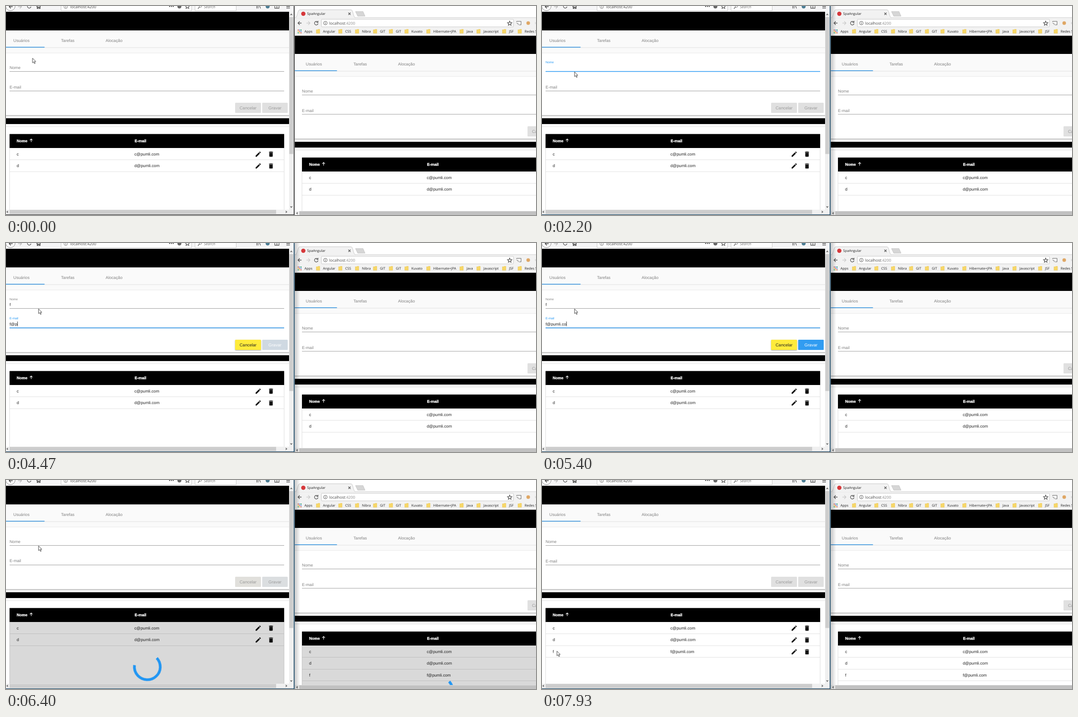
Animation of 1189x471 px, one loop 8 s. Source, as an HTML page:

```html
<!DOCTYPE html>
<html lang="pt">
<head>
<meta charset="utf-8">
<title>Cadastro</title>
<style>
html, body { margin: 0; width: 100%; height: 100%; overflow: hidden; background: #fff; }
#stage { display: block; width: 1189px; height: 471px; }
text { font: 9.2px "Liberation Sans", Arial, sans-serif; text-rendering: geometricPrecision; white-space: pre; }
.ui text { font: 7.7px "Open Sans", "Noto Sans", sans-serif; fill: #222; }
.ui .url { font-size: 8.65px; fill: #444; }
.th { font-size: 8.7px; font-weight: bold; fill: #fff; stroke: #fff; stroke-width: .35px; }
.tab { fill: #808080; }
.label { fill: #808080; }
.btn text { font-size: 9.5px; fill: #9a9a9a; }
.btn rect { fill: #e0e0e0; }
.line { fill: none; stroke: #555; stroke-width: 1.3; }
.ripple, .caret, .busy, .added { opacity: 0; }
.ripple { transform-box: fill-box; transform-origin: center; }

.live *, .frame, .shade, .pointer, .busy, .busy *, .added { animation: 8s infinite cubic-bezier(.25,.8,.25,1); }
.frame { fill: #333; animation-name: frame; animation-timing-function: step-end; }
.shade { opacity: 0; animation-name: shade; animation-timing-function: step-end; }
.pointer { animation-name: pointer; animation-timing-function: linear; }
.live .name .label { animation-name: nameLabel; }
.live .name .ripple { animation-name: nameRipple; }
.live .name .edge { animation: nameEdge 8s step-end infinite; }
.live .name .caret { animation: nameCaret 8s step-end infinite; }
.live .mail .label { animation-name: mailLabel; }
.live .mail .ripple { animation-name: mailRipple; }
.live .mail .edge { animation: mailEdge 8s step-end infinite; }
.live .mail .caret { animation: mailCaret 8s step-end infinite; }
.live .cancel rect { animation-name: cancel; }
.live .cancel text { animation-name: cancelText; }
.live .save rect { animation-name: save; }
.live .save text { animation-name: saveText; }
.busy { animation: busy 8s step-end infinite; }
.busy g { animation-name: turn; animation-timing-function: linear; }
.busy circle { animation-name: arc; animation-timing-function: cubic-bezier(.35,0,.25,1); }
.added { animation: addedRemote 8s step-end infinite; }
.live .added { animation: addedLocal 8s step-end infinite; }

@keyframes frame { 0% { fill: #333 } 5.8%, 100% { fill: #17425f } }
@keyframes shade { 0% { opacity: 0 } 5.8%, 100% { opacity: 1 } }
@keyframes pointer {
  0%, .7% { transform: translate(59.5px,117.5px) }
  3.5% { transform: translate(66px,135px) }
  6.6%, 88.4% { transform: translate(73px,148.5px) }
  89.1% { transform: translate(78px,142px) }
  90.9% { transform: translate(105px,133px) }
  92.5% { transform: translate(129px,152px) }
  94.1% { transform: translate(132px,220px) }
  95.75% { transform: translate(110px,310px) }
  97.5% { transform: translate(60px,372px) }
  99%, 100% { transform: translate(33.5px,385.5px) }
}
@keyframes nameLabel {
  0%, 8% { transform: none; fill: #808080 }
  13%, 35.875% { transform: translateY(-13.5px) scale(.75); fill: #2196f3 }
  39%, 76.69% { transform: translateY(-13.5px) scale(.75); fill: #808080 }
  81.69%, 100% { transform: none; fill: #808080 }
}
@keyframes mailLabel {
  0%, 35.875% { transform: none; fill: #808080 }
  40.875%, 76.69% { transform: translateY(-13.5px) scale(.75); fill: #2196f3 }
  81.69%, 100% { transform: none; fill: #808080 }
}
@keyframes nameRipple {
  0%, 8% { opacity: 0; transform: scaleX(.5) }
  9.5% { opacity: 1 }
  12%, 35.875% { opacity: 1; transform: none }
  39.625%, 100% { opacity: 0; transform: none }
}
@keyframes mailRipple {
  0%, 35.875% { opacity: 0; transform: scaleX(.5) }
  37.2% { opacity: 1 }
  39.625%, 76.69% { opacity: 1; transform: none }
  80.44%, 100% { opacity: 0; transform: none }
}
@keyframes nameEdge {
  0% { transform: none } 30.75% { transform: translateX(2.6px) } 76.69%, 100% { transform: none }
}
@keyframes nameCaret {
  0% { opacity: 0 } 8.25% { opacity: 1 } 14% { opacity: 0 }
  20.75% { opacity: 1 } 27.4% { opacity: 0 }
  30.75% { opacity: 1 } 35.8%, 100% { opacity: 0 }
}
@keyframes mailEdge {
  0% { transform: none }
  41.5% { transform: translateX(2.6px) }
  43.25% { transform: translateX(11.9px) }
  55.75% { transform: translateX(17.1px) }
  57.4% { transform: translateX(22.2px) }
  59% { transform: translateX(29.9px) }
  60.8% { transform: translateX(31.9px) }
  62.4% { transform: translateX(34px) }
  64% { transform: translateX(36.5px) }
  65.75% { transform: translateX(41.1px) }
  67.4% { transform: translateX(46.2px) }
  69% { transform: translateX(54px) }
  76.69%, 100% { transform: none }
}
@keyframes mailCaret {
  0% { opacity: 0 } 35.8% { opacity: 1 } 49% { opacity: 0 }
  55.75% { opacity: 1 } 75.8%, 100% { opacity: 0 }
}
@keyframes cancel {
  0%, 30.75% { fill: #e0e0e0; filter: drop-shadow(0 0 0 #0000) }
  35.75%, 76.8% { fill: #ffeb3b; filter: drop-shadow(0 1px .8px #0006) }
  81.8%, 100% { fill: #e0e0e0; filter: drop-shadow(0 0 0 #0000) }
}
@keyframes cancelText {
  0%, 30.75% { fill: #9a9a9a } 31.5%, 76.69% { fill: #222 } 77.5%, 100% { fill: #9a9a9a }
}
@keyframes save {
  0%, 55.75% { fill: #e0e0e0; filter: drop-shadow(0 0 0 #0000) }
  60.75%, 64% { fill: #2196f3; filter: drop-shadow(0 1px .8px #0006) }
  65.75% { fill: #b5cfe4; filter: drop-shadow(0 0 .3px #0002) }
  70%, 76.8% { fill: #2196f3; filter: drop-shadow(0 1px .8px #0006) }
  81.8%, 100% { fill: #e0e0e0; filter: drop-shadow(0 0 0 #0000) }
}
@keyframes saveText {
  0%, 30.75% { fill: #9a9a9a } 31.5%, 76.69% { fill: #fff } 77.5%, 100% { fill: #9a9a9a }
}
@keyframes busy { 0% { opacity: 0 } 76.6% { opacity: 1 } 84.6%, 100% { opacity: 0 } }
@keyframes addedLocal { 0% { opacity: 0 } 84.6%, 100% { opacity: 1 } }
@keyframes addedRemote { 0% { opacity: 0 } 79%, 100% { opacity: 1 } }
@keyframes turn {
  0%, 76.75% { transform: rotate(-90deg) } 89.25%, 100% { transform: rotate(90deg) }
}
@keyframes arc {
  0%, 76.75% { stroke-dasharray: 18 360; stroke-dashoffset: 0 }
  83% { stroke-dasharray: 288 360; stroke-dashoffset: 0 }
  89.25%, 100% { stroke-dasharray: 18 360; stroke-dashoffset: -270 }
}
</style>
</head>
<body>
<svg id="stage" viewBox="0 0 1189 471"></svg>
<script>
const rect = (x, y, w, h, fill, more = '') =>
  `<rect x="${x}" y="${y}" width="${w}" height="${h}" fill="${fill}" ${more}/>`;
const text = (x, y, s, cls = '', more = '') => `<text x="${x}" y="${y}" class="${cls}" ${more}>${s}</text>`;
const path = (d, more = 'class="line"') => `<path d="${d}" ${more}/>`;
const dot = (x, y, r, fill) => `<circle cx="${x}" cy="${y}" r="${r}" fill="${fill}"/>`;
const ring = (x, y, r, color = '#555') =>
  `<circle cx="${x}" cy="${y}" r="${r}" fill="none" stroke="${color}"/>`;
const star = (x, y) => path(`M${x} ${y - 5}l1.4 3.3 3.6.3-2.7 2.4.8 3.5-3.1-1.9-3.1 1.9.8-3.5-2.7-2.4 3.6-.3z`);
const reload = (x, y) => path(`M${x + 3} ${y - 2.5}A4 4 0 1 0 ${x + 4} ${y + 1}M${x + 4} ${y - 5}v3.6h-3.6`);
const arrow = (x, y, dir, color) =>
  path(`M${x + 4 * dir} ${y}H${x - 4 * dir}M${x} ${y - 4}L${x + 4 * dir} ${y}L${x} ${y + 4}`,
    `fill="none" stroke="${color}" stroke-width="1.4"`);

const PEN = 'M3 17.25V21h3.75L17.81 9.94l-3.75-3.75zM20.71 7.04a1 1 0 0 0 0-1.41l-2.34-2.34a1 1 0 0 0-1.41 0l-1.83 1.83 3.75 3.75z';
const BIN = 'M6 19c0 1.1.9 2 2 2h8c1.1 0 2-.9 2-2V7H6zM19 4h-3.5l-1-1h-5l-1 1H5v2h14z';
const icon = (d, x, y) => path(d, `fill="#111" transform="translate(${x} ${y}) scale(.65)"`);

const field = (cls, y, label, value) => `<g class="${cls}" transform="translate(8 ${y})">
  ${rect(0, 5, 616, 1, '#9a9a9a')}
  <rect class="ripple" y="4.8" width="616" height="1.5" fill="#2196f3"/>
  ${text(0, 0, value, '', 'fill="#222"')}
  <g class="edge">${rect(0, -9, 66, 12, '#fff')}<rect class="caret" x=".2" y="-8.5" width="1" height="10.5" fill="#222"/></g>
  ${text(0, 0, label, 'label')}</g>`;

const button = (cls, x, w, label) => `<g class="btn ${cls}">
  ${rect(x, 218, w, 23, '#e0e0e0', 'rx="1.5"')}
  ${text(x + w / 2, 233, label, '', 'text-anchor="middle"')}</g>`;

const row = (i, id, cls = '') => {
  const y = 320 + 26.7 * i;
  return `<g class="${cls}">${text(24, y + 16.5, id, '', 'fill="#222"')}
  ${text(288, y + 16.5, id + '@pumli.com', '', 'fill="#222"')}
  ${icon(PEN, 558, y + 6)}${icon(BIN, 586.7, y + 6)}
  ${rect(8, Math.round(y + 26), 616, 1, '#e0e0e0')}</g>`;
};

const page = (cls, x, y, w, h, left, top) =>
  `<svg class="${cls}" x="${x}" y="${y}" width="${w}" height="${h}" viewBox="${left} ${top} ${w} ${h}">
  ${rect(-8, 0, 700, 500, '#fafafa')}
  ${rect(-8, 13, 700, 42, '#000')}
  ${text(16.5, 81, 'Usuários', 'tab')}${text(123.5, 81, 'Tarefas', 'tab')}${text(223.5, 81, 'Alocação', 'tab')}
  ${rect(-8, 93.3, 700, 1, '#dedede')}${rect(-8, 92, 94.5, 1.5, '#2a8fe0')}
  ${rect(-8, 105.5, 700, 1, '#e4e4e4')}${rect(-8, 106.5, 642.5, 140, '#fff')}
  ${rect(-8, 246, 643, 1.2, '#aaa')}${rect(-8, 247.2, 643, 1.3, '#dedede')}
  ${field('name', 142, 'Nome', 'f')}
  ${field('mail', 185.5, 'E-mail', 'f@pumli.com')}
  ${button('cancel', 514, 58, 'Cancelar')}${button('save', 574.7, 57.3, 'Gravar')}
  ${rect(-8, 253, 700, 13, '#000')}
  ${rect(-8, 271.5, 700, 1, '#e2e2e2')}${rect(-8, 272.5, 643, 200, '#fff')}
  ${rect(7.5, 289, 1, 180, '#dcdcdc')}${rect(623.5, 289, 1, 180, '#dcdcdc')}
  ${rect(8, 288.5, 616, 31.5, '#000')}
  ${text(24, 306.5, 'Nome', 'th')}${text(288.5, 306.5, 'E-mail', 'th')}
  ${path('M56.5 306.5V299.7M53.5 302.7l3-3 3 3', 'fill="none" stroke="#fff" stroke-width="1.2"')}
  ${row(0, 'c')}${row(1, 'd')}${row(2, 'f', 'added')}
  <g class="busy">${rect(8, 320, 616, 160, '#000', 'fill-opacity=".15"')}
    <g style="transform-origin:317px 421px"><circle cx="317" cy="421" r="29" fill="none"
      stroke="#2196f3" stroke-width="6" pathLength="360"/></g></g>
  </svg>`;

const leftBar = `<g class="ui">
  ${rect(0, 0, 646, 13, '#f6f6f7')}
  ${dot(10, 0, 10.5, '#fff')}${ring(10, 0, 10.5, '#888')}${arrow(11, 1.5, -1, '#444')}
  ${arrow(31, 1.5, 1, '#bbb')}${reload(52, .5)}
  ${path('M68.5 1L73 -3.5 77.5 1M70 0V5.5H72V2.5H74.5V5.5H76.5V0', 'fill="none" stroke="#444" stroke-width="1.5"')}
  ${rect(123.5, -8, 293, 18.5, '#fff', 'stroke="#c8c8c8"')}
  ${ring(134, 1.5, 4, '#777')}${rect(133.5, 0, 1, 4, '#777')}
  ${text(144, 4.7, 'localhost:4200', 'url')}
  ${[367, 371, 375].map(x => dot(x, 1, 1.2, '#444')).join('')}
  ${dot(389, 1, 4.5, '#666')}${star(407, 1)}
  ${rect(424, -8, 92.5, 18.5, '#fff', 'stroke="#c8c8c8"')}
  ${ring(436, 0, 3, '#777')}${path('M434 2.5l-3.5 3.5')}
  ${text(444, 4.7, 'Search', 'url', 'style="font-style:italic;fill:#777"')}
  ${path('M562.5 -2V5.5M565.5 -2V5.5M568 -2L571 5.5')}
  ${dot(587, 1, 4.5, '#4b7d94')}
  ${path('M603 -4H612.5V5H603ZM607.7 -4V5')}
  ${path('M629 1H637M629 4.5H637')}
</g>`;

const tri = (x, y, turn) => path('M-2 -1.6L0 1 2 -1.6',
  `fill="none" stroke="#505050" stroke-width="1.3" transform="translate(${x} ${y}) rotate(${turn})"`);

const leftScroll = rect(635, 13, 10, 446, '#f0f0f0') + rect(635.5, 25, 9, 308.5, '#cdcdcd')
  + tri(640, 19, 180) + tri(640, 453, 0)
  + rect(0, 459, 645, 11, '#f0f0f0') + rect(8, 459.5, 598, 9, '#cdcdcd')
  + tri(3, 464, 90) + tri(629, 464, -90);

const bookmarks = [[711, 'Angular'], [761, 'CSS'], [798.5, 'Nibra'], [839, 'GIT'], [874.5, 'GIT'], [909.5, 'Kuvato'],
  [958.5, 'Hibernate+JPA'], [1033, 'Java'], [1071, 'Javascript'], [1128.5, 'JSF'], [1163.5, 'Redes S']];

const folder = x => path(`M${x} 53.5h3l1 -1h4v9h-8z`, 'fill="#f7d768" stroke="#e2bd4b" stroke-width=".5"');

let apps = '';
for (let i = 0; i < 9; i++)
  apps += rect(654.5 + i % 3 * 3.2, 53 + (i / 3 | 0) * 3.2, 2.1, 2.1, ['#de5347', '#4a8af4', '#1aa260', '#f6b92b'][i % 4]);

const rightBar = `<g class="ui">
  ${rect(648, 26, 541, 41, '#f2f2f2')}${rect(648, 25.7, 541, .8, '#c4c4c4')}
  ${path('M649 26.8C654 26 654 8.5 659 8.5H774C779 8.5 779 26 784 26.8Z', 'fill="#f2f2f2" stroke="#bbb" stroke-width=".8"')}
  ${rect(649.5, 26, 134, 1.5, '#f2f2f2')}
  ${path('M784 12.5H801L805.5 23H789Z', 'fill="#d6d6d6" stroke="#bbb" stroke-width=".7"')}
  ${dot(667, 17.5, 4.8, '#d6383b')}${text(675.5, 20.3, 'SpaAngular')}
  ${path('M768 15l5 5M773 15l-5 5')}
  ${arrow(659, 38.5, -1, '#555')}${arrow(678, 38.5, 1, '#ccc')}${reload(696, 38.5)}
  ${rect(707.5, 30, 431, 17, '#fff', 'stroke="#bbb" stroke-width=".8" rx="1.5"')}
  ${ring(716.5, 38.5, 4)}${rect(716, 37.7, 1, 3.2, '#555')}${rect(716, 36, 1, 1, '#555')}
  <text x="725" y="41.6" class="url">localhost<tspan fill="#888">:4200</tspan></text>
  ${star(1130, 39)}
  ${path('M1145.5 36V34.5H1155.5V42.5H1151M1145.5 38.5A4 4 0 0 1 1149.5 42.5', 'fill="none" stroke="#666"')}
  ${dot(1171.5, 38.5, 4, '#dfa765')}${dot(1189, 38.5, 2.5, '#ddd')}
  ${apps}${text(669.5, 60, 'Apps')}
  ${bookmarks.map(([x, s]) => folder(x - 15) + text(x, 60, s)).join('')}
</g>`;

const rightScroll = rect(648, 462, 541, 9, '#f1f1f1') + rect(658, 462.5, 531, 8.5, '#c1c1c1') + tri(653, 467, 90);

stage.innerHTML = `<defs><linearGradient id="fade"><stop stop-opacity=".2"/><stop offset="1" stop-opacity="0"/></linearGradient></defs>
  ${rect(0, 0, 1189, 471, '#fff')}
  ${rightBar}${page('', 648, 67, 541, 395, -8, 14)}${rightScroll}
  ${rect(648, 0, 12, 471, 'url(#fade)', 'class="shade"')}
  ${leftBar}${page('live', 0, 13, 635, 446, 0, 13)}${leftScroll}
  <path class="frame" d="M645.5 0H647.5V471H0V469.7H645.5Z"/>
  <path class="pointer" d="M0 0V10.6L2.5 8.4 4.3 12.4 6 11.7 4.3 7.7H7.4Z" fill="#fff" stroke="#222" stroke-width=".9"/>`;
</script>
</body>
</html>
```
